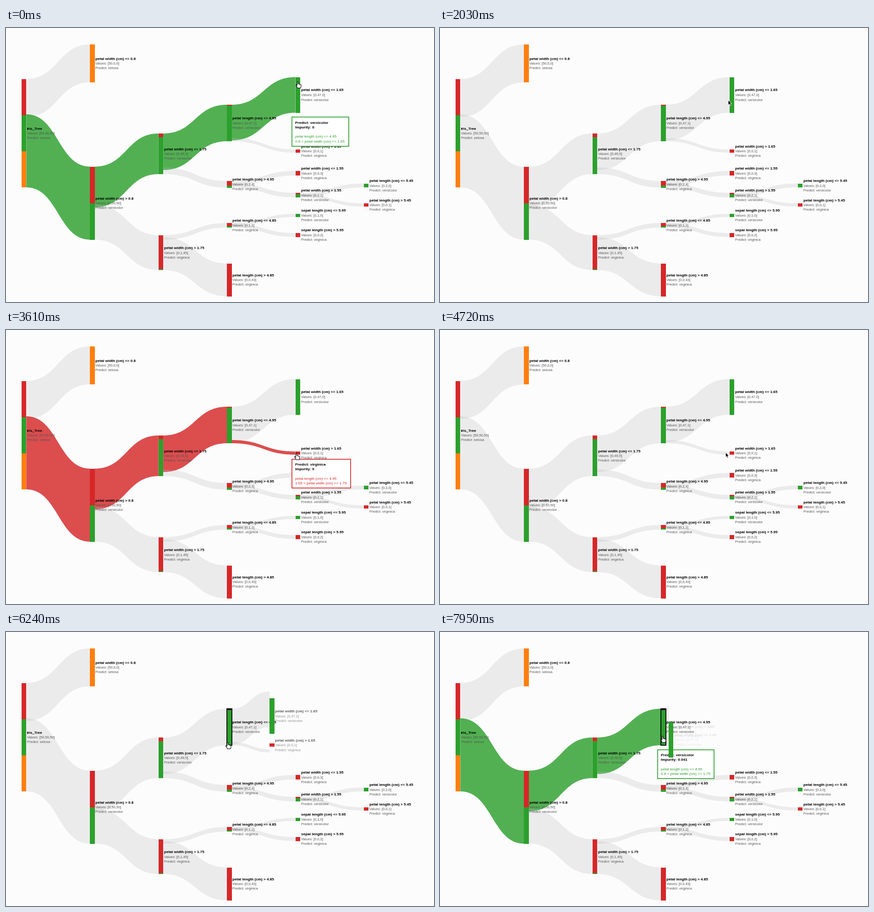
Write a matplotlib script that moves like this. It is 934x600 px and loops after 7990 ms.

```python
import numpy as np
import matplotlib.pyplot as plt
from matplotlib.animation import FuncAnimation
from matplotlib.patches import PathPatch, Polygon, Rectangle
from matplotlib.path import Path

W, H, DPI = 934, 600, 100
PX = 72 / DPI
LOOP, STEP = 7990, 34
BG = "#fcfcfd"
RED, GREEN, ORANGE = "#d62728", "#2ca02c", "#ff7f0e"
COLORS = {"setosa": ORANGE, "versicolor": GREEN, "virginica": RED}
BAR, COL = 10.3, 149.4

# parent, top, bottom, title, (setosa, versicolor, virginica), prediction
NODES = [
    (None, 111.5, 349, "Iris_Tree", (50, 50, 50), "setosa"),
    (0, 36, 119, "petal width (cm) <= 0.8", (50, 0, 0), "setosa"),
    (0, 303.5, 463.5, "petal width (cm) > 0.8", (0, 50, 50), "versicolor"),
    (2, 231, 320, "petal width (cm) <= 1.75", (0, 49, 5), "versicolor"),
    (2, 453.5, 530, "petal width (cm) > 1.75", (0, 1, 45), "virginica"),
    (3, 168, 248, "petal length (cm) <= 4.95", (0, 47, 1), "versicolor"),
    (3, 335, 349.5, "petal length (cm) > 4.95", (0, 2, 4), "virginica"),
    (4, 427, 437, "petal length (cm) <= 4.85", (0, 1, 2), "virginica"),
    (4, 515.5, 587.5, "petal length (cm) > 4.85", (0, 0, 43), "virginica"),
    (5, 107.5, 185.5, "petal width (cm) <= 1.65", (0, 47, 0), "versicolor"),
    (5, 266, 273, "petal width (cm) > 1.65", (0, 0, 1), "virginica"),
    (6, 313, 323, "petal width (cm) <= 1.55", (0, 0, 3), "virginica"),
    (6, 361, 371, "petal width (cm) > 1.55", (0, 2, 1), "versicolor"),
    (7, 407, 413.7, "sepal length (cm) <= 5.95", (0, 1, 0), "versicolor"),
    (7, 449, 457.5, "sepal length (cm) > 5.95", (0, 0, 2), "virginica"),
    (12, 340.5, 349, "petal length (cm) <= 5.45", (0, 2, 0), "versicolor"),
    (12, 384, 391, "petal length (cm) > 5.45", (0, 0, 1), "virginica"),
]
HUB, LEAF, TWIG = 5, 9, 10

# impurity, first rule, second rule, box width
TIPS = {
    HUB: ("0.041", "petal length (cm) <= 4.95", "0.8 < petal width (cm) <= 1.75", 123.5),
    LEAF: ("0", "petal length (cm) <= 4.95", "0.8 < petal width (cm) <= 1.65", 123.5),
    TWIG: ("0", "petal length (cm) <= 4.95", "1.65 < petal width (cm) <= 1.75", 128),
}

# time, x, y of the pointer tip
POINTER = np.array([
    (0, 637, 117), (190, 637, 120), (450, 637, 121), (1200, 637, 122),
    (1730, 637, 125), (1930, 637, 130), (2060, 627, 165), (2450, 610, 230),
    (2750, 611, 236), (3120, 611, 236), (3400, 632, 268), (3620, 634, 270),
    (4650, 634, 271), (4950, 588, 258), (5300, 500, 226), (5480, 488, 217),
    (6050, 488, 217), (6300, 483, 248), (6580, 480, 260), (6830, 480, 259),
    (7000, 484, 244), (7210, 486, 231), (7460, 486, 228), (7990, 486, 228),
])
CLICK_CLOSE, CLICK_OPEN, MOVE = 5795, 7645, 1000
CLEAR_FROM, CLEAR_TO = 5760, 6800

HAND = np.array([
    (-1.6, 1), (-.5, 0), (.8, 1), (.9, 5), (3, 5.1), (3.2, 5.8), (5, 5.9),
    (5.3, 6.6), (6.8, 7.2), (7, 10), (5.8, 14), (-1, 14), (-2.4, 10.8),
    (-4.4, 8.2), (-3.8, 7), (-1.6, 8.4)])
ARROW = np.array([
    (0, 0), (0, 10.8), (2.4, 8.5), (4.2, 12.5), (6, 11.7), (4.3, 7.9),
    (7.6, 7.7)])

fig = plt.figure(figsize=(W / DPI, H / DPI), dpi=DPI, facecolor=BG)
ax = fig.add_axes([0, 0, 1, 1])
ax.set_xlim(0, W)
ax.set_ylim(H, 0)
ax.axis("off")


def write(x, y, text, size, color="black", bold=False, z=4):
    return ax.text(x, y, text, fontsize=size * PX, color=color, zorder=z,
                   family="Liberation Sans", va="baseline",
                   weight="bold" if bold else "normal")


def cubic_in_out(t):
    t = min(max(t, 0), 1)
    return 4 * t ** 3 if t < .5 else 1 - 4 * (1 - t) ** 3


def ribbon(x0, a, x1, b, h):
    m = (x0 + x1) / 2
    points = [(x0, a), (m, a), (m, b), (x1, b), (x1, b + h),
              (m, b + h), (m, a + h), (x0, a + h), (x0, a)]
    codes = [Path.MOVETO] + [Path.CURVE4] * 3 + [Path.LINETO] \
        + [Path.CURVE4] * 3 + [Path.CLOSEPOLY]
    return Path(points, codes)


def depth(i):
    parent = NODES[i][0]
    return 0 if parent is None else 1 + depth(parent)


def left(i):
    return 34 + COL * depth(i)


def path_to(i):
    while i:
        yield i
        i = NODES[i][0]


class Node:
    def __init__(self, i):
        self.parent, self.top, self.bottom, title, values, self.kind = NODES[i]
        self.x, self.h = left(i), self.bottom - self.top
        self.color = COLORS[self.kind]
        self.bars, self.link = [], None
        y = self.top
        for n, color in zip(values[::-1], (RED, GREEN, ORANGE)):
            if n:
                h = self.h * n / sum(values)
                bar = Rectangle((self.x, y), BAR, h, fc=color, ec="none", lw=0, zorder=3)
                self.bars.append((ax.add_patch(bar), y - self.top))
                y += h
        tx, mid = self.x + BAR + 1.7, (self.top + self.bottom) / 2
        counts = "Values: [%d,%d,%d]" % values
        self.labels = [
            (write(tx, mid - 8, title, 8.15, bold=True), -8),
            (write(tx, mid + 2.8, counts, 7.45, "#555555"), 2.8),
            (write(tx, mid + 13, "Predict: " + self.kind, 7.45, "#555555"), 13)]
        if self.parent is not None:
            _, top, bottom = NODES[self.parent][:3]
            first = next(k for k, n in enumerate(NODES) if n[0] == self.parent) == i
            self.slot = top if first else bottom - self.h
            self.link_x = left(self.parent) + BAR
            shape = ribbon(self.link_x, self.slot, self.x, self.top, self.h)
            self.link = ax.add_patch(PathPatch(shape, lw=0, ec="none", zorder=1))

    def tint(self, color):
        self.link.set_facecolor(color or "#bbbbbb")
        self.link.set_alpha(.82 if color else .25)

    def place(self, p, z):
        """Slide between the parent (p = 0) and the own place (p = 1)."""
        hub = NODES[self.parent]
        x = self.x - COL * (1 - p)
        start = (hub[1] + hub[2]) / 2
        y = start + (self.top - start) * p
        for bar, dy in self.bars:
            bar.set_xy((x, y + dy))
            bar.set_zorder(z)
            bar.set_visible(p > 0)
        for label, dy in self.labels:
            label.set_position((x + BAR + 1.7, y + self.h / 2 + dy))
            label.set_alpha(p)
        end = max(x, self.link_x)
        end_y = self.slot + (self.top - self.slot) * p
        self.link.set_path(ribbon(self.link_x, self.slot, end, end_y, self.h))
        self.link.set_visible(end > self.link_x)


nodes = [Node(i) for i in range(len(NODES))]
tip_box = ax.add_patch(Rectangle((0, 0), 1, 63.5, fc="white", lw=1.7 * PX, zorder=5))
tip_lines = [write(0, 0, "", 8.2, bold=k < 2, z=5.1) for k in range(4)]
pointer = ax.add_patch(Polygon(ARROW, closed=True, zorder=10, joinstyle="round"))


def show_tip(i):
    for part in [tip_box] + tip_lines:
        part.set_visible(i is not None)
    if i is None:
        return
    node = nodes[i]
    impurity, rule, range_, width = TIPS[i]
    x, y = node.x - 7.6, node.bottom + 9.5
    tip_box.set_xy((x, y))
    tip_box.set_width(width)
    tip_box.set_edgecolor(node.color)
    texts = ["Predict: " + node.kind, "Impurity: " + impurity, rule, range_]
    for line, text, dy in zip(tip_lines, texts, (14.6, 24.8, 45.4, 55.6)):
        line.set_text(text)
        line.set_position((x + 7.3, y + dy))
    for line in tip_lines[2:]:
        line.set_color(node.color)


def node_under(x, y):
    for i in TIPS:
        n = nodes[i]
        if n.x - 1 <= x <= n.x + BAR and n.top <= y <= n.bottom:
            return i
    return None


def update(frame):
    t = frame * STEP + 28
    x, y = (np.interp(t, POINTER[:, 0], POINTER[:, k]) for k in (1, 2))
    under = node_under(x, y)
    active = None if CLEAR_FROM <= t < CLEAR_TO else under

    lit = set(path_to(active))
    for i, node in enumerate(nodes[1:], 1):
        node.tint(nodes[active].color if i in lit else None)
    show_tip(active)

    opening = t >= CLICK_OPEN
    if opening:
        p = cubic_in_out((t - CLICK_OPEN) / MOVE)
    else:
        p = 1 - cubic_in_out((t - CLICK_CLOSE) / MOVE)
    z = 3 if p == 1 else 6
    nodes[LEAF].place(p, z + .2 * opening)
    nodes[TWIG].place(p, z + .1)

    for bar, _ in nodes[HUB].bars:
        closed = t >= CLICK_CLOSE
        bar.set_edgecolor("black" if closed else "none")
        bar.set_linewidth(1.8 * PX if closed else 0)

    hand = under is not None
    pointer.set_xy((HAND if hand else ARROW) + (x, y))
    pointer.set_facecolor("white" if hand else "black")
    pointer.set_edgecolor("black" if hand else "white")
    pointer.set_linewidth((1.1 if hand else .8) * PX)
    return []


anim = FuncAnimation(fig, update, frames=LOOP // STEP, interval=STEP,
                     repeat=True, repeat_delay=0)
plt.show()
```
